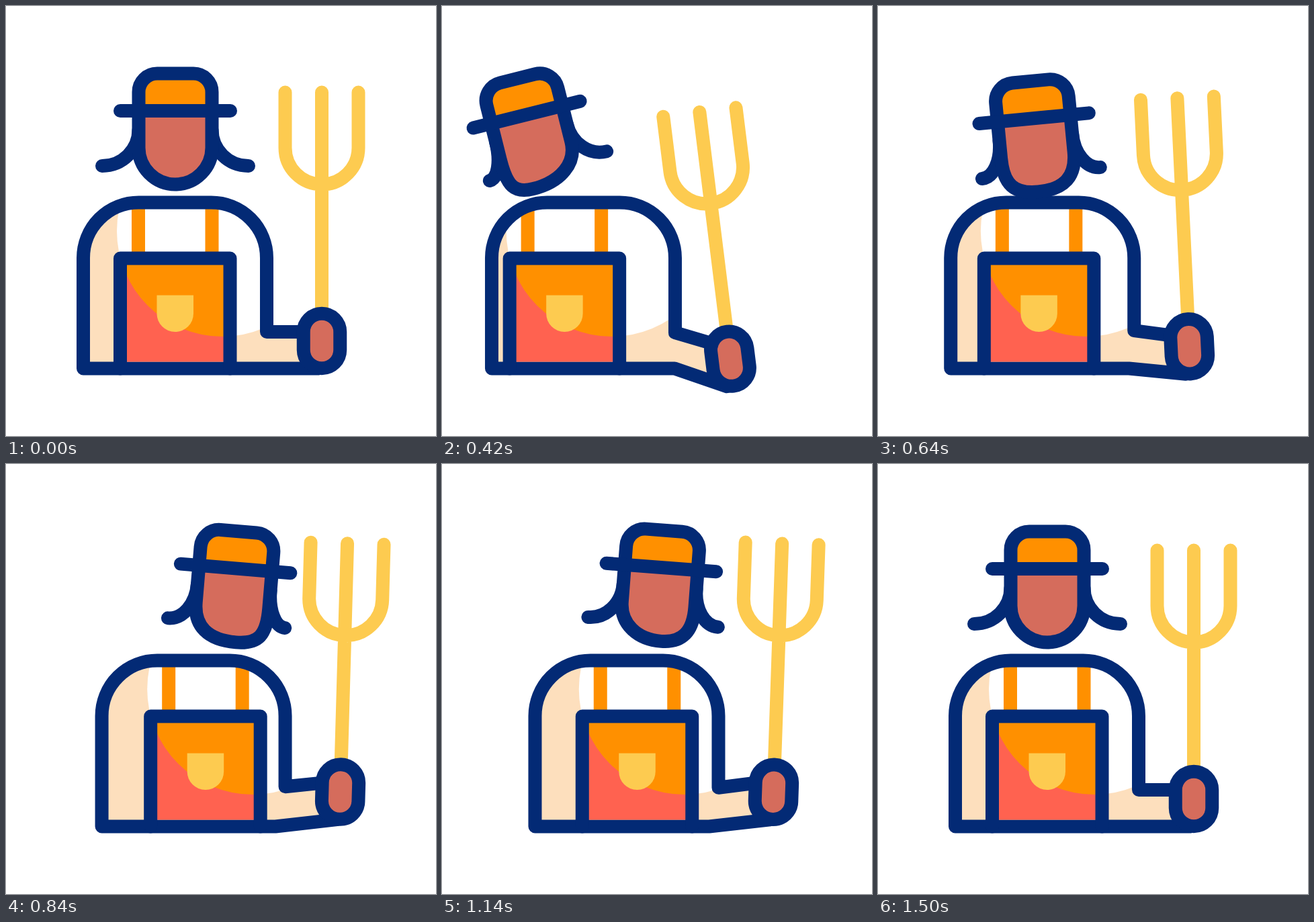
Write an HTML page that moves like this. It is 640 by 640 pixels and loops after 2400 ms.

```html
<!DOCTYPE html>
<html lang="en">
<head>
<meta charset="utf-8">
<title>Farmer</title>
<style>
  html, body { margin: 0; width: 100%; height: 100%; overflow: hidden; background: #fff; }
  svg { display: block; width: 100%; height: 100%; }
  .line { fill: none; stroke: #032a75; stroke-width: 20; stroke-linecap: round; stroke-linejoin: round; }
  .fork { fill: none; stroke: #fdcb50; stroke-width: 20; stroke-linecap: round; }
  .orange { fill: #ff9000; }
  .skin { fill: #d56c5c; }
  .yellow { fill: #fdcb50; }
</style>
</head>
<body>
<svg viewBox="0 0 640 640" xmlns="http://www.w3.org/2000/svg">
  <defs>
    <clipPath id="torsoClip"><path id="torsoMask"/></clipPath>
    <clipPath id="bibClip"><rect x="170" y="375.5" width="163.5" height="154"/></clipPath>
    <clipPath id="hatClip"><rect x="-70" y="-70" width="140" height="70"/></clipPath>
  </defs>

  <path id="torso" fill="#fddfbd"/>
  <g clip-path="url(#torsoClip)">
    <g id="shirt">
      <circle cx="322" cy="335" r="157" fill="#fff"/>
      <path class="orange" d="M187 295h20v80h-20zM296.5 295h20v80h-20z"/>
    </g>
  </g>
  <path id="outline" class="line"/>

  <g id="apron">
    <rect x="170" y="375.5" width="163.5" height="154" fill="#ff6250"/>
    <circle class="orange" cx="322" cy="335" r="157" clip-path="url(#bibClip)"/>
    <path class="yellow" d="M224.500 430.500h54.500v27.250a27.250 27.250 0 0 1-54.500 0z"/>
    <path class="line" d="M170 539.500V375.500H333.500V539.500"/>
  </g>

  <g id="hand">
    <path class="fork" d="M0-370V-40M-54.500-370v82.500a54.500 54.500 0 0 0 109 0v-82.500"/>
    <rect class="line" x="-27.250" y="-40.750" width="54.500" height="81.500" rx="27.250" style="fill:#d56c5c"/>
  </g>

  <g id="head">
    <path id="flaps" class="line"/>
    <path id="face" class="skin"/>
    <path id="crown" class="orange" clip-path="url(#hatClip)"/>
    <path id="rim" class="line"/>
    <path class="line" d="M-82 0H82"/>
  </g>
</svg>

<script>
const LOOP = 2400, STEP = 20;
const LEFT = 433, RIGHT = 930, REST = 1500;
const RAD = Math.PI / 180;
const el = id => document.getElementById(id);
const set = (id, name, value) => el(id).setAttribute(name, value);

// Which swing is running, and how far along it is
function swing(t) {
  if (t < LEFT) return [0, t / LEFT];
  if (t < RIGHT) return [1, (t - LEFT) / (RIGHT - LEFT)];
  const u = Math.min(1, (t - RIGHT) / (REST - RIGHT));
  return [2, u + u * u - u * u * u];
}

function draw(t) {
  const [part, u] = swing(t);
  const track = (a, b, v = u) => [a * v, a + (b - a) * v, b * (1 - v)][part];

  const bx = track(-42.3, 43);
  const ax = track(-71.5, 71);
  const hx = 470 + bx;
  const dy = track(27.5, -18.8);
  const hy = 498.5 + dy;
  const tilt = track(-7.3, 3.6);

  const elbow = 485 + track(1.2, -6);
  const wrist = 485 + dy * (dy > 0 ? 0.65 : 1);
  const body = `M${115 + bx} 539.500V375a82.500 82.500 0 0 1 82.500-82.500H${305.5 + bx}` +
    `a82.500 82.500 0 0 1 82.500 82.500V${elbow}L${hx - 27} ${wrist}H${hx - 15}` +
    `L${hx - 5} ${hy + 41}L${379 + 0.8 * bx} 539.500Z`;
  for (const id of ["torso", "torsoMask", "outline"]) set(id, "d", body);

  set("shirt", "transform", `translate(${ax})`);
  set("apron", "transform", `translate(${ax})`);
  set("hand", "transform", `translate(${hx} ${hy}) rotate(${tilt})`);
  drawHead(part, u, track);
}

function drawHead(part, u, track) {
  const soft = part === 1 ? u + 0.4 * (u * u * (3 - 2 * u) - u) : u;
  const lean = track(-14.5, 8, soft);
  const chinX = 252 + track(-102.5, 121);
  const dip = [2.6 * u ** 3, 2.6 - 6.8 * u + 77 * u * (1 - u) ** 2, -4.2 * (1 - u)][part];
  const x = chinX + 109 * Math.sin(lean * RAD);
  const y = 265 + dip - 109 * Math.cos(lean * RAD);
  set("head", "transform", `translate(${x} ${y}) rotate(${lean})`);

  // Inward sway of each ear flap, which also squares that side of the jaw
  const inL = track(32.5, 11), inR = track(7, 33);
  const flap = (side, sway) => {
    const w = 54 - sway;
    return `M${side * 54.5} 28C${side * 54.5} 58 ${side * (54.5 + 0.45 * w)} 82 ${side * (55 + w)} 82`;
  };
  set("flaps", "d", flap(-1, inL) + flap(1, inR));

  const chin = 0.7 * (inR - inL);
  const kl = 0.55 + 0.007 * inL, kr = 0.55 + 0.007 * inR;
  const shape = `M-54.500 55V-28a27.500 27.500 0 0 1 27.500-27.500H27` +
    `a27.500 27.500 0 0 1 27.500 27.500V55` +
    `C54.500 ${55 + 54.5 * kr} ${chin + (54.5 - chin) * kr} 109.500 ${chin} 109.500` +
    `C${chin - (54.5 + chin) * kl} 109.500-54.500 ${55 + 54.5 * kl}-54.500 55Z`;
  for (const id of ["face", "crown", "rim"]) set(id, "d", shape);
}

const start = performance.now();
function tick(now) {
  const t = Math.max(0, now - start) % LOOP;
  draw(Math.floor(t / STEP) * STEP);
  requestAnimationFrame(tick);
}
draw(0);
requestAnimationFrame(tick);
</script>
</body>
</html>
```
